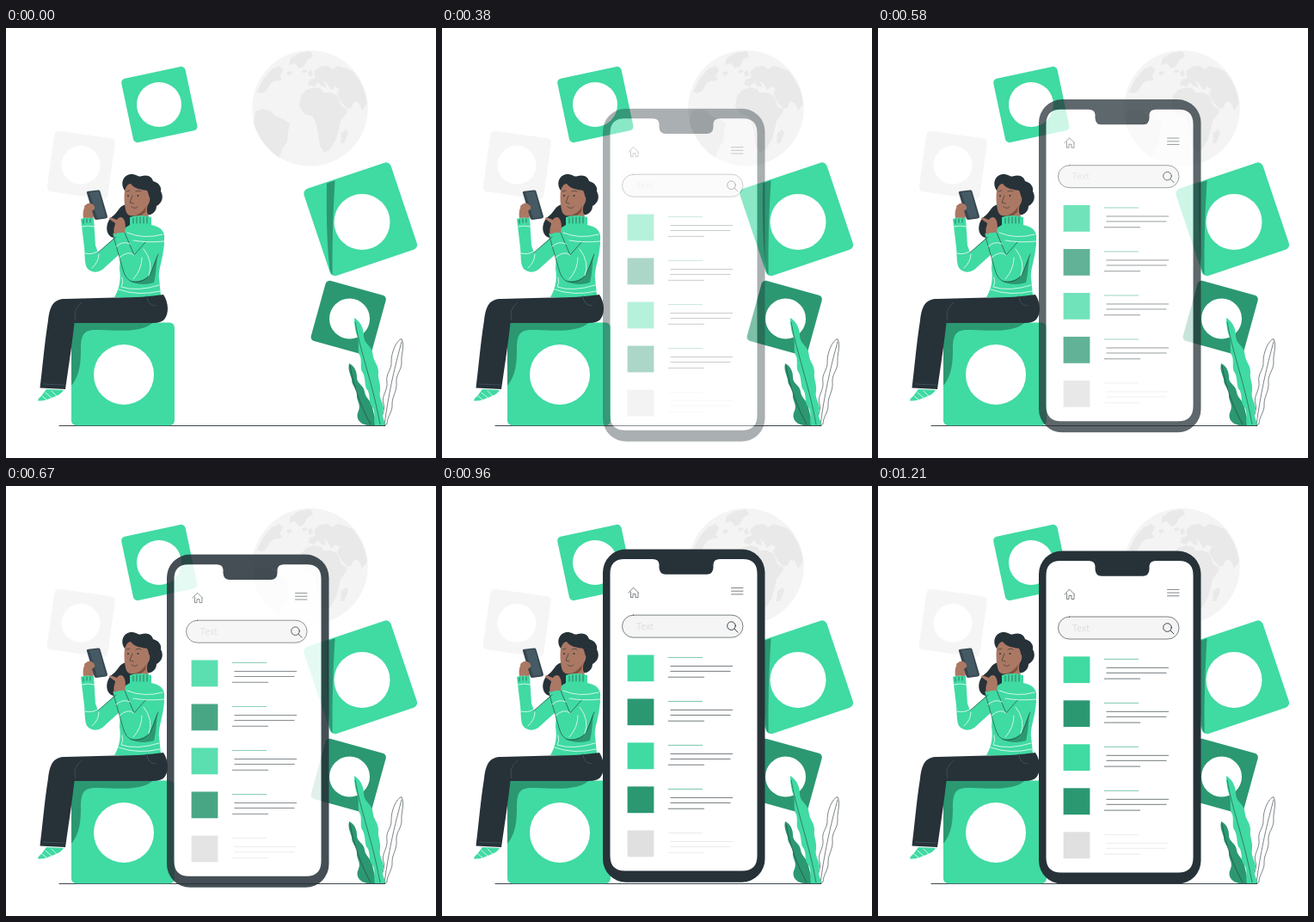
An HTML page that plays this animation: 500 by 500 pixels, repeating every 1.25 s.

```html
<!DOCTYPE html>
<html lang="en">
<head>
<meta charset="utf-8">
<title>Browsing</title>
<style>
  html, body { margin: 0; width: 100%; height: 100%; overflow: hidden; background: #fff; }
  svg { display: block; width: 100%; height: 100%; }
  .green { fill: #40daa3; }
  .deep { fill: #2b9872; }
  .dark { fill: #263238; }
  .skin { fill: #ab7864; }
  .line { fill: none; stroke: #263238; stroke-width: .6; stroke-linecap: round; stroke-linejoin: round; }
  .knit { fill: none; stroke: #fff; stroke-width: .75; stroke-linecap: round; }
  #phone { opacity: 0; }
  text { font: 10.5px "Open Sans", "Noto Sans", sans-serif; fill: #dcdcdc; }
</style>
</head>
<body>
<svg viewBox="0 0 500 500">
  <!-- globe -->
  <circle cx="353.5" cy="93.3" r="67.3" fill="#f4f4f4"/>
  <g fill="#e9e9e9">
    <path d="M331 35L341 29L354 27L357 33L350 37L347 44L341 47L336 41L329 43Z"/>
    <path d="M309 48L318 44L322 48L320 53L314 61L308 64L302 74L297 76L292 74L299 60Z"/>
    <path d="M326 52l5-2l2 3l-5 3zM314 59l5-3l2 4l-6 2z"/>
    <path d="M290 97L298 94L307 96L313 102L322 106L330 111L328 121L327 132L321 141L318 151Q296 136 288 111Z"/>
    <path d="M343 79L349 72L358 69L367 71L369 75L378 75L386 79L390 91L397 95L396 99L389 108L387 117L384 129L377 141L370 145L365 137L363 125L361 113L357 103L347 100L341 91Z"/>
    <path d="M390 122l6-4l2 4l-5 12l-4 0z"/>
    <path d="M351 66L353 60L360 58L358 51L365 45L374 44L379 48L386 44L393 46L403 50Q417 66 420 88L414 96L411 88L405 85L402 92L397 94L390 86L385 76L388 71L383 68L378 72L374 65L369 61L373 69L367 68L363 63L358 68Z"/>
    <path d="M357 55l-4 2l-2-5l4-4zM344 50l4-2l3 2l-5 3z"/>
  </g>

  <!-- app tiles -->
  <g transform="translate(178.3 89) rotate(-12)"><rect class="green" x="-38" y="-38" width="76" height="76" rx="5"/></g>
  <circle cx="178" cy="89" r="26" fill="#fff"/>
  <g transform="translate(87.3 159.3) rotate(8)"><rect x="-35.6" y="-35.6" width="71.2" height="71.2" rx="5" fill="#f5f5f5"/></g>
  <circle cx="87" cy="159.3" r="22.5" fill="#fff"/>
  <g transform="translate(412.2 222.3) rotate(-18.6)"><rect class="green" x="-53.3" y="-53.3" width="106.6" height="106.6" rx="6"/></g>
  <path class="deep" d="M373 180.5L382.5 177.3Q379 232 379.5 287.5Q378 286 376.500 281Q372 245 373 180.5Z"/>
  <circle cx="414" cy="225.5" r="32.5" fill="#fff"/>
  <g transform="translate(398.2 337.4) rotate(15.5)"><rect class="deep" x="-36.4" y="-36.4" width="72.8" height="72.8" rx="5"/></g>
  <circle cx="399.5" cy="338" r="23.5" fill="#fff"/>

  <path class="line" style="stroke-width:.9" d="M62 462.5H441"/>
  <rect class="green" x="76" y="342.5" width="120" height="119.7" rx="6"/>
  <path class="deep" d="M76 416C86 404 87 388 87 374C87 355 91 350 108 351C134 352 158 354 171 342.5H82Q76 342.5 76 349Z"/>
  <circle cx="137" cy="403" r="35" fill="#fff"/>

  <!-- plant -->
  <path class="line" style="fill:#fff" d="M438 462C433 454 442 446 439 437C436 428 444 422 443 412C441 402 449 397 448 388C448 377 454 363 460 361.500C464 370 459 380 460 389C460 398 453 403 454 412C455 422 449 428 449 437C450 446 443 452 443 460Z"/>
  <path class="line" d="M440 462C444 430 451 397 460 365"/>
  <path class="deep" d="M399 390C405 393 408 399 408 406C408 414 416 415 417 423C418 431 425 433 426 441L431 462H420C410 460 406 453 410 445C413 437 407 433 408 426C408 419 402 416 402 409C401 403 397 398 399 390Z"/>
  <path class="green" d="M405 337C413 342 416 350 416 358C416 367 426 370 426.500 379C427 388 433 391 433 400C432 409 436 413 435 422C433 431 439 435 439 443C436 451 440 455 441 461L439 462H429C427 456 430 449 427 442C421 436 424 430 421 422C416 417 419 410 415 401C411 396 414 389 412 382C408 376 411 368 409 360C406 353 405 346 405 337Z"/>
  <path class="line" style="stroke-width:.55" d="M406 342C412 377 427 415 435 461M400 393C405 420 414 443 424 461"/>

  <!-- woman -->
  <path class="dark" d="M139 205C131 208 131 213 125 218C116 224 115 237 121 242C129 248 139 240 146 228L148 214Z"/>
  <path class="skin" d="M139 182C137 192 137 203 139 211C140 217 144 219 147 218L145 226H166L165 206L168 188L150 178Z"/>
  <path d="M147 218C154 218 160 213 163 207L162 214C157 219 152 220 147 221Z" fill="#80513f"/>
  <path class="dark" d="M138 189C132 180 137 170 146 170C152 170 154 174 158 172C166 170 170 174 171 178C178 180 181 185 180 190C184 197 181 204 175 207C175 213 170 218 165 217C163 213 164 209 165 205C168 199 166 193 164 189C158 188 149 187 145 181C140 182 140 185 138 189Z"/>
  <path class="skin" d="M162 205C161 199 164 195 167 197C168 200 166 206 163 207Z"/>
  <path class="line" d="M140 190l4-1M151 190q3-2 6 0M147 195l-3 8l4 1M146 208q4 3 7 0"/>
  <g class="dark"><circle cx="142" cy="195" r=".9"/><circle cx="153.500" cy="195" r=".9"/></g>

  <path class="green" d="M144 220Q156 216 169 220L169 229C180 231 185 237 184 245C184 267 177 279 178 291L180 311Q154 316 126 313C132 303 134 292 132 280L133 262L112 281Q103 287 95 280C91 275 92 265 91 255L87 222Q94 219 102 221L104 253L107 261L139 232L144 229Z"/>
  <path class="green" d="M124 239Q131 236 138 238L149 264L162 250Q172 237 184 245C184 260 177 276 168 289Q160 298 147 295Q139 293 136 281Z"/>
  <path class="deep" d="M176 264C175 276 174 289 172 296Q157 301 143 294Q160 297 168 286Z"/>
  <path class="line" d="M124 239L136 281Q139 293 147 295Q160 297 168 286L177 263M138 238L149 264L163 248M107 261L128 243"/>
  <path class="knit" d="M88 231Q96 229 103 231M92 262Q100 264 106 260M100 279Q108 272 108 263M128 254Q136 247 144 251M132 267Q142 258 149 264M148 292Q158 281 158 267M166 288Q172 272 160 257M141 238Q160 246 182 240M148 247Q165 250 184 248M135 290Q137 296 134 301Q152 307 178 299M131 304Q153 312 179 306"/>
  <path class="line" d="M148 221v6M152 220v7M156 220v7M160 220v7M164 220v7M90 223v4M94 222v4M98 222v4"/>

  <path class="skin" d="M90 221C89 214 90 207 96 204L104 207L105 213L101 221Q95 220 90 221Z"/>
  <path d="M94 192Q93 190 96 189.700L107 188.600Q109 188.500 109.500 190L118 219Q118 221 116 221.500L105 223Q103 223 102.500 221Z" fill="#37474f"/>
  <path d="M97 191L108 190L116 220L106 221Z" fill="#455a64"/>
  <path class="skin" d="M91 207Q97 201 102 206Q105 210 101 212L94 217ZM121 220L129 223Q132 218 136 221C140 226 139 233 138 238Q132 237 126 240C124 234 127 230 127 227L120 222Z"/>

  <path class="dark" d="M183 310C189 319 190 332 184 339Q180 343 171 343H79.500C77 366 73 393 69 420L39.500 418.500C42.500 394 45 365 49 340C51 322 56 315 69 315L126 313.500Q155 314 183 310Z"/>
  <path d="M164 311Q164 322 174 323M88 319Q77 328 81 340M43 414L68 415" fill="none" stroke="#455a64" stroke-width=".7"/>
  <path class="green" d="M47 420L67 421Q64 426 58 428L48 432Q42 434 37 433.500Q37 431 41 428Z"/>
  <path class="knit" d="M42 428l5 4M46 424l7 6M53 422l6 6"/>

  <!-- phone, drawn in its resting place -->
  <g id="phone">
    <rect class="dark" x="187" y="75.400" width="188.500" height="387.200" rx="27"/>
    <path fill="#fff" d="M212 87H245Q252 87 252.500 93V97Q253 104.700 260 104.700H308Q315 104.700 315.500 97V93Q316 87 323 87H350Q366.500 87 366.500 104V432Q366.500 449.500 349 449.500H213Q195.500 449.500 195.500 432V104Q195.500 87 212 87Z"/>
    <path class="line" d="M217 126L222.500 120L228.500 126M219.500 125V131.500H222V127.500H225V131.500H228V126"/>
    <path class="line" d="M336.500 120.400H350M336.500 124.100H350M336.500 127.800H350"/>
    <rect class="line" style="fill:#f5f5f5" x="209.500" y="152" width="140.500" height="26" rx="13"/>
    <text x="226" y="168.800">Text</text>
    <g class="line" style="stroke-width:.9"><circle cx="336.500" cy="164.500" r="4.800"/><path d="M340 168L344 172"/></g>
  </g>
</svg>
<script>
const phone = document.getElementById('phone');

function add(tag, attrs) {
  const el = document.createElementNS('http://www.w3.org/2000/svg', tag);
  for (const name in attrs) el.setAttribute(name, attrs[name]);
  phone.append(el);
}

// List rows: tile, title rule, three text rules.
const tiles = ['#40daa3', '#2b9872', '#40daa3', '#2b9872', '#e0e0e0'];
const rules = [[263, 303, 3], [265.5, 338, 13], [265.5, 335.5, 19], [263, 305, 25.8]];
tiles.forEach((fill, row) => {
  const y = 198.3 + row * 51;
  add('rect', { x: 215.6, y, width: 30.8, height: 30.8, fill });
  rules.forEach(([x1, x2, dy], i) => {
    const stroke = row === 4 ? '#e0e0e0' : i ? '#263238' : '#2fa880';
    add('line', { x1, x2, y1: y + dy, y2: y + dy, stroke, 'stroke-width': .65 });
  });
});

// Cubic Bezier easing (.36, -.01, .5, 1.38), solved by bisection.
function ease(x) {
  const curve = (a, b, s) => 3 * (1 - s) ** 2 * s * a + 3 * (1 - s) * s * s * b + s ** 3;
  let lo = 0, hi = 1;
  for (let i = 0; i < 30; i++) {
    const mid = (lo + hi) / 2;
    if (curve(.36, .5, mid) < x) lo = mid; else hi = mid;
  }
  return curve(-.01, 1.38, lo);
}

// Slide up in 30 held steps, hidden for the first three.
const STEPS = 30, LOOP = 1250, RISE = 30;
const frames = [];
for (let k = 0; k <= STEPS; k++) {
  const p = ease(Math.min(1, (k + 1) / STEPS));
  frames.push({
    offset: Math.min(1, Math.round(k * 25 / 6) * 10 / LOOP),
    opacity: k < 3 ? 0 : Math.min(1, p),
    transform: `translateY(${(RISE * (1 - p)).toFixed(3)}px)`,
    easing: 'step-end'
  });
}
phone.animate(frames, { duration: LOOP, iterations: Infinity });
</script>
</body>
</html>
```
